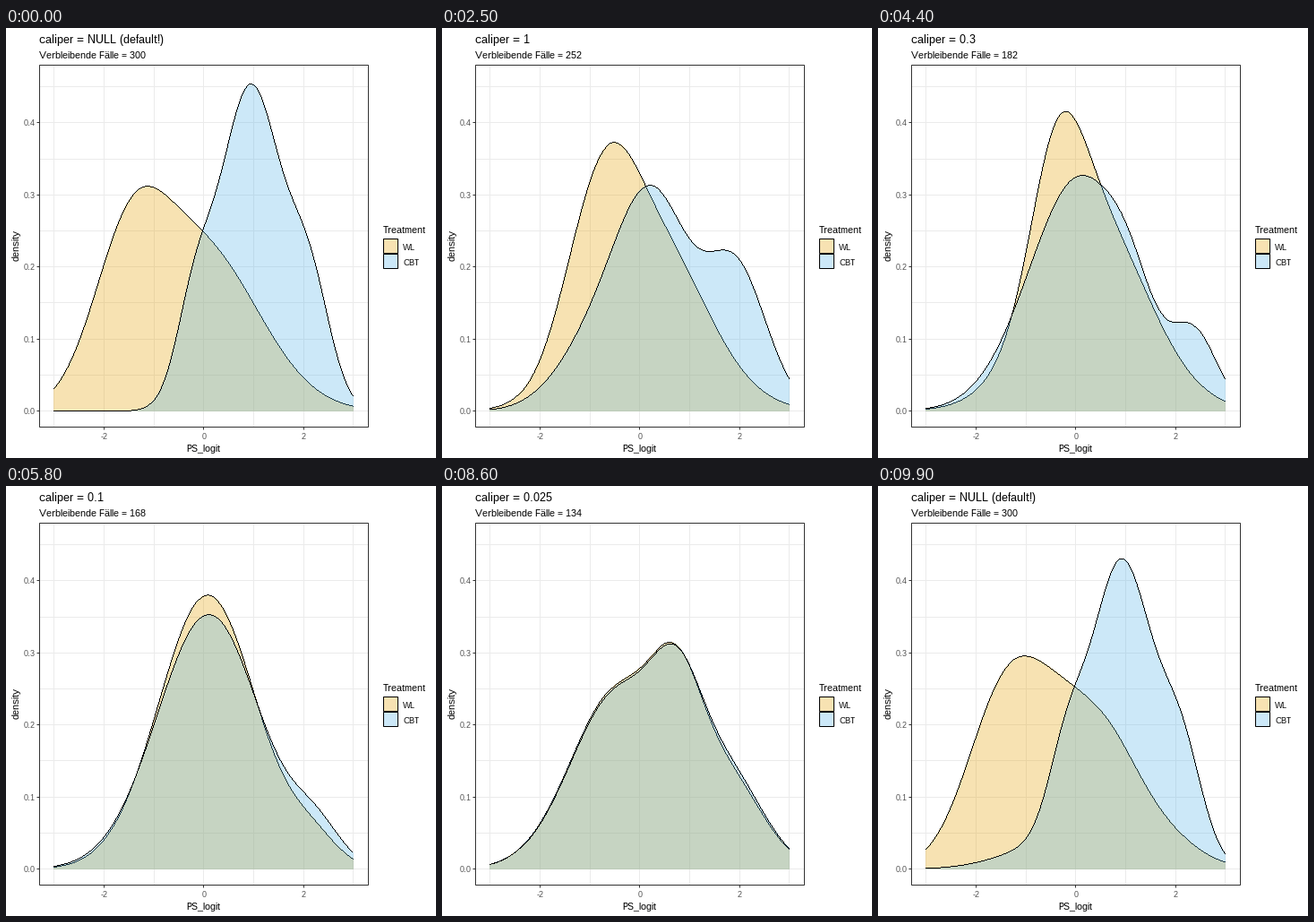
These frames come from a looping animation (480 by 480 pixels, 10 s). A matplotlib script:

```python
import numpy as np
import matplotlib.pyplot as plt
from matplotlib.animation import FuncAnimation
from matplotlib.patches import Polygon, Rectangle

plt.rcParams.update({
    "font.family": ["Liberation Sans", "DejaVu Sans"],
    "text.hinting": "native",
    "text.hinting_factor": 1,
    "path.simplify": False,
})

SIZE, DPI = 480, 72
FRAMES, STEP_MS, TWEEN = 100, 100, 7
X0, Y0, X_UNIT, Y_UNIT = 220.75, 427.6, 55.64, 804.4
LEFT, TOP, RIGHT, BOTTOM = 37, 41, 404, 445
ORANGE, BLUE, ALPHA = "#E69F00", "#56B4E9", 0.3
GRID, DARK, TICK_TEXT = "#EBEBEB", "#333333", "#4D4D4D"

xs = np.linspace(-3, 3, 512)


def px(x):
    return X0 + np.asarray(x) * X_UNIT


def py(y):
    return Y0 - np.asarray(y) * Y_UNIT


def bumps(*parts):
    """Sum of bell curves given as (height, centre, width)."""
    return sum(h * np.exp(-((xs - c) / w)**2 / 2) for h, c, w in parts)


# (caliper, remaining cases, WL density, CBT density)
states = [
    ("NULL (default!)", 300,
     bumps((.19, -1.5, .73), (.225, -.05, 1.15)),
     bumps((.122, -.19, .37), (.45, .94, .63), (.155, 2.13, .42))),
    ("1", 252,
     bumps((.225, -1.1, .58), (.25, .15, 1.05)),
     bumps((.07, -1.15, .7), (.305, .28, .72), (.225, 1.9, .58))),
    ("0.5", 212,
     bumps((.22, -.47, .52), (.248, .25, 1.13)),
     bumps((.31, .05, .95), (.135, 2.1, .65))),
    ("0.3", 182,
     bumps((.185, -.37, .53), (.27, .33, 1.09)),
     bumps((.325, .1, 1.03), (.04, 1.1, .4), (.09, 2.4, .45))),
    ("0.1", 168,
     bumps((.38, .08, .98), (.034, 2.2, .5)),
     bumps((.353, .1, 1.03), (.048, 2.25, .5))),
    ("0.025", 134,
     bumps((.248, -.43, .95), (.15, .75, .5), (.12, 1.75, .72)),
     bumps((.245, -.43, .95), (.147, .75, .5), (.128, 1.75, .72))),
]
# The 0.05 caliper lies halfway between its neighbours.
states.insert(5, ("0.05", 150, *((states[4][n] + states[5][n]) / 2 for n in (2, 3))))

# Each state takes 14 frames; the second and third hold one frame longer.
starts = [8 + 14 * i + min(i, 2) for i in range(len(states))]

fig = plt.figure(figsize=(SIZE / DPI, SIZE / DPI), dpi=DPI, facecolor="white")
ax = fig.add_axes([0, 0, 1, 1])
ax.set(xlim=(0, SIZE), ylim=(SIZE, 0))
ax.axis("off")


def line(x, y, color, z):
    ax.plot(np.floor(x), np.floor(y), color=color, lw=1, zorder=z, snap=True,
            solid_capstyle="butt")


def frame_box(x, y, w, h, color):
    ax.add_patch(Rectangle((x, y), w, h, fill=False, ec=color, lw=1, zorder=8,
                           snap=True))


def label(x, y, s, size=11, color="black", **kw):
    return ax.text(x, y, s, fontsize=size, color=color, zorder=9, **kw)


def draw_panel():
    for x in range(-3, 4):
        line([px(x)] * 2, [TOP, BOTTOM], GRID, 1)
    for y in np.arange(10) * 0.05:
        line([LEFT, RIGHT], [py(y)] * 2, GRID, 1)
    for x in (-2, 0, 2):
        line([px(x)] * 2, [BOTTOM, BOTTOM + 3], DARK, 8)
        label(px(x), 459, str(x), 9, TICK_TEXT, ha="center")
    for y in np.arange(5) / 10:
        line([LEFT - 3, LEFT], [py(y)] * 2, DARK, 8)
        label(32.5, np.floor(py(y)) + 4, f"{y:.1f}", 9, TICK_TEXT, ha="right")
    frame_box(LEFT, TOP, RIGHT - LEFT, BOTTOM - TOP, DARK)
    label(220.5, 473, "PS_logit", ha="center")
    label(12, 243, "density", rotation=90, ha="center", va="center")


def draw_legend():
    label(421, 229, "Treatment")
    for name, color, y in (("WL", ORANGE, 235), ("CBT", BLUE, 252)):
        ax.add_patch(Rectangle((421, y), 16, 16, fc=color, alpha=ALPHA, lw=0,
                               zorder=7))
        frame_box(421, y, 16, 16, "black")
        label(443, y + 13, name, 9)


def pixel_pen(x, y):
    """Trace a curve as crisp single pixels, one per step of its longer axis."""
    step = np.maximum(abs(np.diff(x)), abs(np.diff(y)))
    dist = np.r_[0, np.cumsum(step)]
    s = np.arange(0, dist[-1])
    cx, cy = (np.floor(np.interp(s, dist, v)) + 0.5 for v in (x, y))
    gap = np.full(len(s), np.nan)
    return (np.column_stack([cx - 0.45, cx + 0.45, gap]).ravel(),
            np.column_stack([cy, cy, gap]).ravel())


class Density:
    def __init__(self, color, z):
        self.area = ax.add_patch(Polygon([(0, 0), (0, 1), (1, 0)], fc=color, lw=0,
                                         alpha=ALPHA, zorder=z, antialiased=False))
        self.edge, = ax.plot([], [], color="black", lw=0.9, zorder=z + 1, snap=False,
                             antialiased=False, solid_capstyle="butt")

    def show(self, d):
        x, y = px(xs), py(d)
        self.edge.set_data(*pixel_pen(x, y))
        self.area.set_xy(np.column_stack([np.r_[x, x[-1], x[0]],
                                          np.r_[y, Y0, Y0]]))


draw_panel()
draw_legend()
title = label(37, 17.5, "", 13)
subtitle = label(37, 34, "")
wl, cbt = Density(ORANGE, 2), Density(BLUE, 4)


def update(frame):
    i = next((n for n, s in enumerate(starts) if frame < s + TWEEN - 1),
             len(starts) - 1)
    a, b = states[i], states[(i + 1) % len(states)]
    k = max(0, frame - starts[i] + 1)
    t = k / TWEEN
    wl.show(a[2] + (b[2] - a[2]) * t)
    cbt.show(a[3] + (b[3] - a[3]) * t)
    near = a if k <= 4 else b
    title.set_text(f"caliper = {near[0]}")
    subtitle.set_text(f"Verbleibende Fälle = {near[1]}")
    return wl.area, wl.edge, cbt.area, cbt.edge, title, subtitle


anim = FuncAnimation(fig, update, frames=FRAMES, interval=STEP_MS,
                     repeat=True, repeat_delay=0, blit=False)
plt.show()
```
